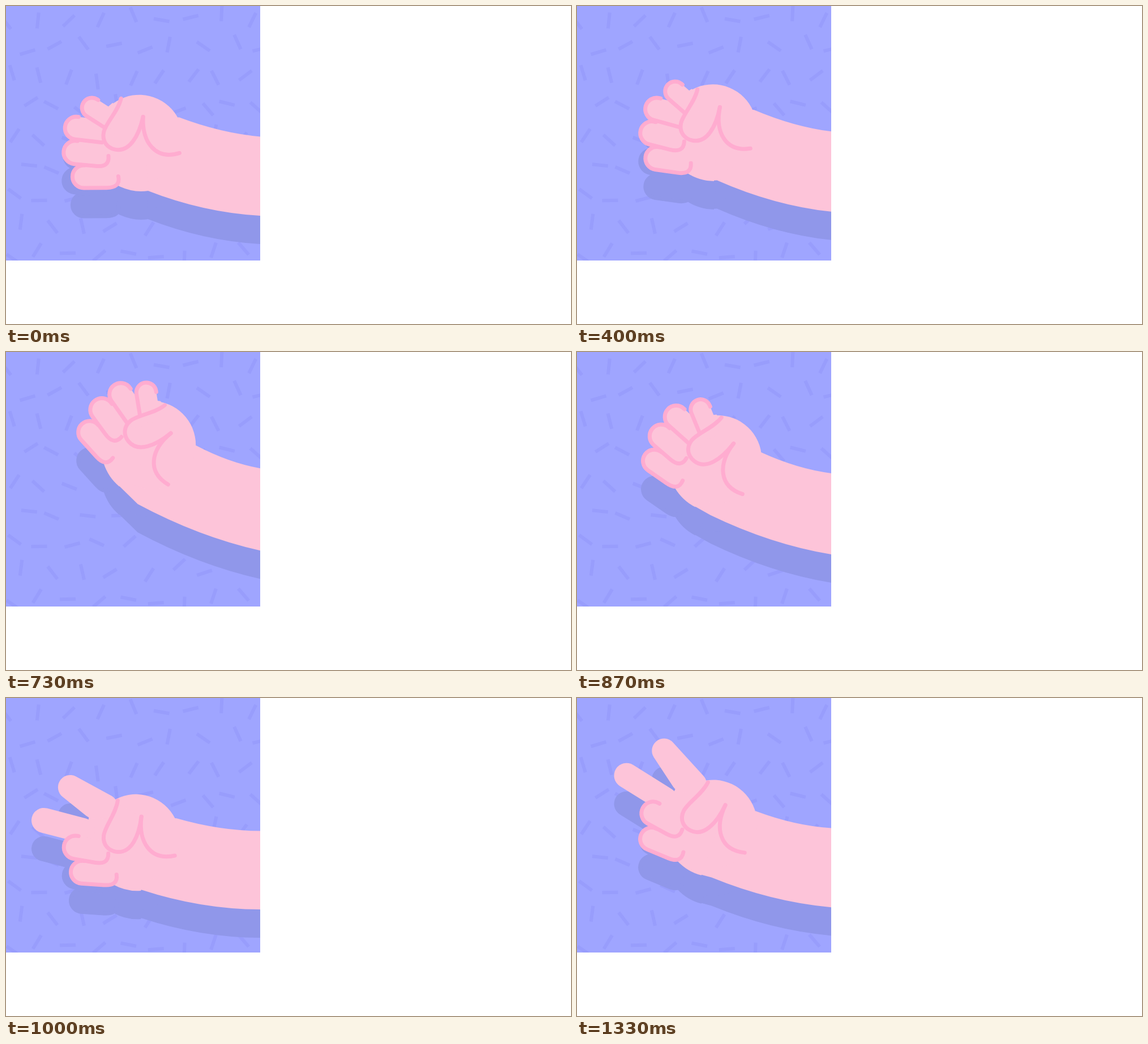
An HTML page with a canvas for the animation above (1860 ms loop, 998 px wide and 561 px high).

```html
<!DOCTYPE html>
<html lang="en">
<head>
<meta charset="utf-8">
<title>Fist to scissors</title>
<style>
  html, body { margin: 0; width: 100%; height: 100%; overflow: hidden; background: #fff; }
  canvas { display: block; }
</style>
</head>
<body>
<canvas id="scene" width="449" height="449"></canvas>
<script>
const ctx = document.getElementById('scene').getContext('2d');
const LOOP = 1860, SIZE = 449;
const SKIN = '#fdc4d9', LINE = '#ffacd0', SHADOW = '#9097ea';
const rad = deg => deg * Math.PI / 180;
const lerp = (a, b, u) => a + (b - a) * u;
const progress = (from, to, v) => Math.min(1, Math.max(0, (v - from) / (to - from)));
const smooth = u => u * u * (3 - 2 * u);

// Curled fingers in hand space, little finger first
const fingers = [
  { x: -92, y: 110, angle: -3, r: 20, len: 40, hook: true },
  { x: -109, y: 68, angle: 3, r: 20.5, len: 38, hook: true },
  { x: -109, y: 25, angle: 4, r: 20, len: 48 },
  { x: -83, y: -12, angle: 30, r: 17.5, len: 37 }
];

// The arm rises with the hand lagging, drops, and settles after the impact
function poseAt(step) {
  const raise = progress(3, 15, step);
  const fall = progress(15, 25, step) ** 2;
  const settle = 1 - (1 - progress(25, 31, step)) ** 2;
  const loose = 1 - progress(0, 3, step);
  const drop = fall ** 2 * (1 - settle);

  const lift = lerp(28 * smooth(raise ** 1.8), -4, fall) + 5 * settle;
  const angle = lerp(55 * smooth(raise ** 2.3), 7, fall) + 18.5 * settle + 2.5 * loose;
  return {
    lift, angle, loose,
    x: 240 + .85 * angle + .32 * lift - 5.5 * drop,
    y: 196 - .21 * angle - 1.68 * lift + 8 * drop,
    open: .86 * progress(21, 25, step) + .14 * settle
  };
}

function polyline(points, color, width) {
  ctx.beginPath();
  points.forEach(p => ctx.lineTo(...p));
  ctx.strokeStyle = color;
  ctx.lineWidth = width;
  ctx.stroke();
}

function outline(color) {
  ctx.strokeStyle = color;
  ctx.lineWidth = 7;
  ctx.stroke();
}

function drawFinger(f, loose, skin, line) {
  ctx.save();
  ctx.translate(f.x - 8 * loose, f.y);
  ctx.rotate(rad(f.angle));
  polyline([[0, 0], [f.len, 0]], skin, 2 * f.r);
  ctx.beginPath();
  ctx.moveTo(2, -f.r);
  ctx.arc(0, 0, f.r, -Math.PI / 2, Math.PI / 2, true);
  ctx.lineTo(f.len, f.r);
  if (f.hook) ctx.bezierCurveTo(f.len + 16, f.r, f.len + 24, f.r - 6, f.len + 21, f.r - 20);
  outline(line);
  ctx.restore();
}

function drawForearm({ x, y, angle, lift }) {
  const top = 230.5 - lift, bottom = 370 - .78 * lift;
  const wrist = { x: x + 65 - .42 * angle, y: y + .42 * angle };
  const heel = { x: x + 10 - 1.35 * angle, y: y + 130 - .1 * angle };
  const c = Math.cos(rad(angle)), s = Math.sin(rad(angle));
  ctx.beginPath();
  ctx.moveTo(wrist.x, wrist.y);
  ctx.quadraticCurveTo((wrist.x + 455) / 2, (wrist.y + top) / 2 + 11, 450, top);
  ctx.lineTo(450, bottom);
  ctx.quadraticCurveTo((heel.x + 450) / 2, (heel.y + bottom) / 2 + 17, heel.x, heel.y);
  ctx.lineTo(x + 10 * c - 130 * s, y + 10 * s + 130 * c);
  ctx.lineTo(x, y);
  ctx.fill();
}

function drawPalm() {
  ctx.beginPath();
  ctx.arc(-5, 39, 77.5, 0, 2 * Math.PI);
  ctx.fill();
  ctx.beginPath();
  [[0, 0], [-55, -22], [-92, 12], [-92, 100], [-35, 125]].forEach(p => ctx.lineTo(...p));
  ctx.quadraticCurveTo(-10, 135, 15, 130);
  ctx.fill();
}

function drawArm(pose, skin, line) {
  const { x, y, angle, loose, open } = pose;
  ctx.fillStyle = skin;
  drawForearm(pose);

  ctx.save();
  ctx.translate(x, y);
  ctx.rotate(rad(angle));
  drawPalm();

  const extended = open > 0;
  if (extended) {
    polyline([[-65, -10], [lerp(-83, -139, open), lerp(-12, -40, open)], [-86, -8]], skin, 43);
    polyline([[-100, 37], [lerp(-109, -180, open), lerp(25, 28, open)]], skin, 44);
  }
  fingers.slice(0, extended ? 2 : 4).forEach(f => drawFinger(f, loose, skin, line));

  // Crease of the palm, then the thumb
  ctx.beginPath();
  ctx.moveTo(0, 0);
  ctx.bezierCurveTo(0, 45, 25, 76, 67, 61);
  outline(line);
  ctx.rotate(rad(10 * loose));
  ctx.beginPath();
  ctx.moveTo(-45, -23);
  ctx.bezierCurveTo(-45, 0, -62, 25, -62, 41);
  ctx.bezierCurveTo(-62, 58, -50, 67, -36, 67);
  ctx.bezierCurveTo(-10, 67, 0, 35, 0, 0);
  outline(line);
  ctx.restore();
}

// Dashes at random angles, scattered around a staggered grid
function drawBackground() {
  let seed = 7;
  const random = () => (seed = seed * 16807 % 2147483647) / 2147483647;
  const pitch = 52;
  ctx.fillStyle = '#9fa5ff';
  ctx.fillRect(0, 0, SIZE, SIZE);
  ctx.lineCap = 'butt';
  for (let row = 0; row < 9; row++) {
    for (let col = 0; col < 9; col++) {
      const x = (col + row % 2 / 2 + .4 * random()) * pitch;
      const y = (row + .2 + .4 * random()) * pitch;
      const turn = Math.PI * random();
      const dx = 14 * Math.cos(turn), dy = 14 * Math.sin(turn);
      polyline([[x - dx, y - dy], [x + dx, y + dy]], '#989dfc', 6);
    }
  }
}

function render(now) {
  // Motion at 25 steps per second, shown on a 30 Hz clock
  const tick = Math.floor((now % LOOP + 4) * .03);
  const pose = poseAt(Math.floor(tick * 5 / 6));
  drawBackground();
  ctx.lineCap = ctx.lineJoin = 'round';
  ctx.save();
  ctx.translate(0, 50);
  drawArm(pose, SHADOW, SHADOW);
  ctx.restore();
  drawArm(pose, SKIN, LINE);
}

function loop() {
  render(performance.now());
  requestAnimationFrame(loop);
}
loop();
</script>
</body>
</html>
```
